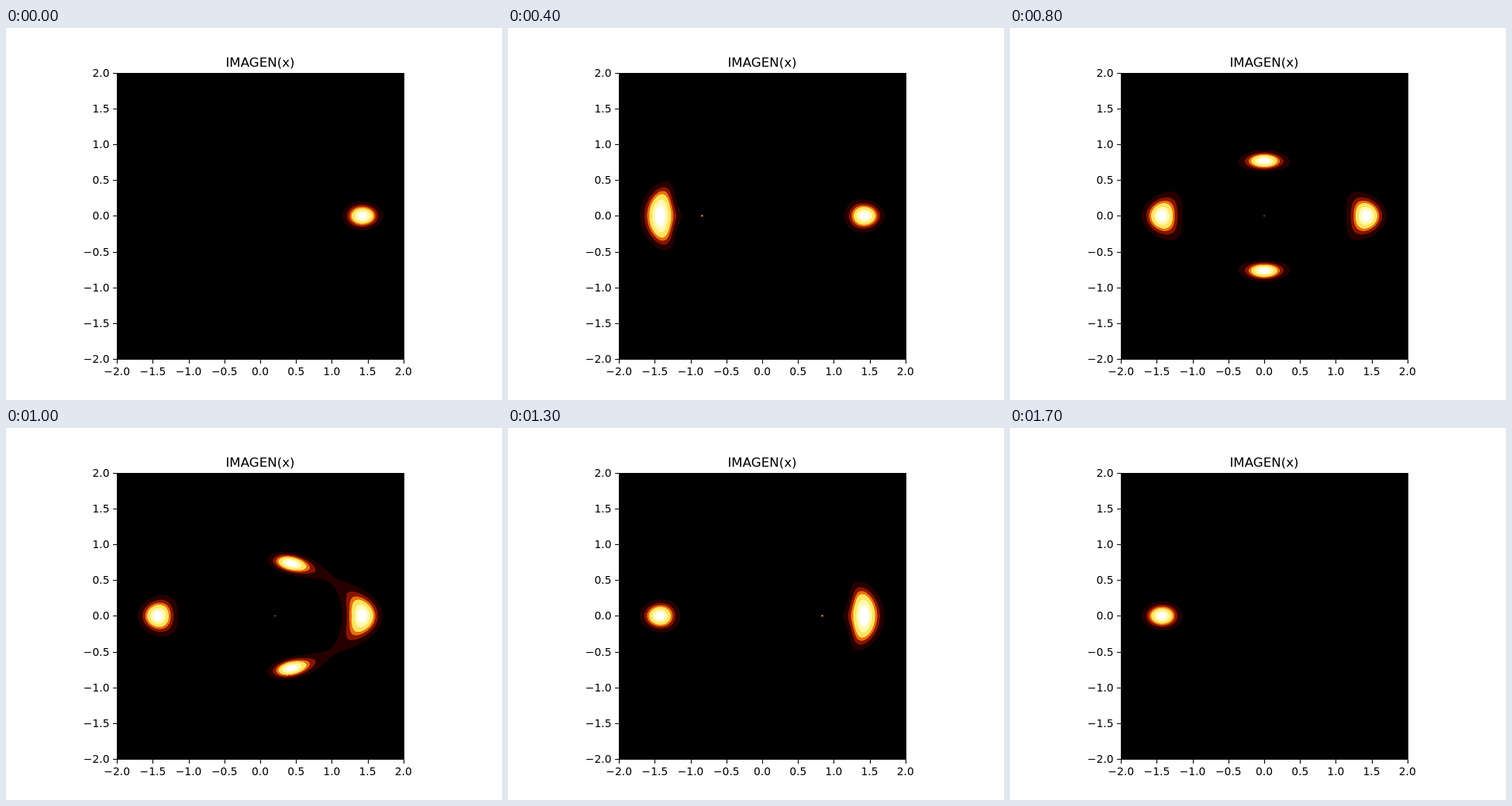
Animation, 640 px wide and 480 px high, one loop 1.8 s. Source, as an HTML page with a canvas:

```html
<!DOCTYPE html>
<html lang="es">
<head>
<meta charset="utf-8">
<title>IMAGEN(x)</title>
<style>
  html, body { margin: 0; width: 100%; height: 100%; overflow: hidden; background: #fff; }
  svg, canvas { position: absolute; left: 0; top: 0; display: block; }
  text { font-family: "DejaVu Sans", sans-serif; font-size: 13.89px; }
  .title { font-size: 16.67px; }
</style>
</head>
<body>
<svg id="plot" width="640" height="480" viewBox="0 0 640 480">
  <rect x="143" y="58" width="371" height="370"/>
  <text class="title" x="328" y="50" text-anchor="middle">IMAGEN(x)</text>
</svg>
<canvas id="view" width="640" height="480"></canvas>
<script>
const NS = 'http://www.w3.org/2000/svg';
const UNIT = 92.4, CX = 328, CY = 242.4;
const FRAME = 100, COUNT = 18;

// Isothermal lens with external shear, in front of a round source
const SHEAR = 0.3, CORE = 0.05, STEP = 0.2;

// Outer source radius of each brightness band and its colour
const BANDS = [
  [0.046, [255, 255, 255]],
  [0.075, [255, 250, 178]],
  [0.106, [255, 228, 98]],
  [0.126, [232, 112, 12]],
  [0.153, [136, 20, 0]],
  [0.197, [38, 0, 0]]
];
const BLACK = [0, 0, 0];

const plot = document.getElementById('plot');
const ctx = document.getElementById('view').getContext('2d');
const area = { x: 150, y: 145, w: 356, h: 195 };
const image = ctx.createImageData(area.w, area.h);

function add(tag, attrs, text) {
  const node = document.createElementNS(NS, tag);
  for (const key in attrs) node.setAttribute(key, attrs[key]);
  if (text) node.textContent = text;
  plot.appendChild(node);
}

function drawAxes() {
  const snap = v => Math.floor(v + 0.5) + 0.5;
  for (let i = -4; i <= 4; i++) {
    const value = i / 2;
    const label = (value < 0 ? '\u2212' : '') + Math.abs(value).toFixed(1);
    const x = CX + value * UNIT, y = CY - value * UNIT;
    add('path', { d: `M${snap(x)} 428v4.9M143 ${snap(y)}h-4.9`, stroke: '#000', 'stroke-width': 1.11 });
    add('text', { x, y: 448, 'text-anchor': 'middle' }, label);
    add('text', { x: 133.5, y: Math.round(y + 5), 'text-anchor': 'end' }, label);
  }
}

// Colour seen at plot point (x, y) with the lens at (lens, 0)
function shade(x, y, lens) {
  const u = x - lens;
  const r = Math.sqrt(u * u + y * y + CORE * CORE);
  const d = Math.hypot((1 - SHEAR) * x - u / r, (1 + SHEAR) * y - y / r);
  for (const [edge, color] of BANDS) if (d < edge) return color;
  return BLACK;
}

function drawImage(lens) {
  const sub = [0.25, 0.75];
  let k = 0;
  for (let j = 0; j < area.h; j++) {
    for (let i = 0; i < area.w; i++) {
      let r = 0, g = 0, b = 0;
      for (const dy of sub) for (const dx of sub) {
        const c = shade((area.x + i + dx - CX) / UNIT, (CY - area.y - j - dy) / UNIT, lens);
        r += c[0]; g += c[1]; b += c[2];
      }
      image.data[k++] = r / 4;
      image.data[k++] = g / 4;
      image.data[k++] = b / 4;
      image.data[k++] = 255;
    }
  }
  ctx.putImageData(image, area.x, area.y);
}

// The lens crosses from left to right and rests two steps at the centre
const lensAt = step => STEP * (step < 9 ? step - 8 : step - 9);

let shown = -1, start = null;
function tick(now) {
  if (start === null) start = now;
  const step = Math.floor((now - start) / FRAME) % COUNT;
  if (step !== shown) {
    shown = step;
    drawImage(lensAt(step));
  }
  requestAnimationFrame(tick);
}

drawAxes();
drawImage(lensAt(0));
requestAnimationFrame(tick);
</script>
</body>
</html>
```
